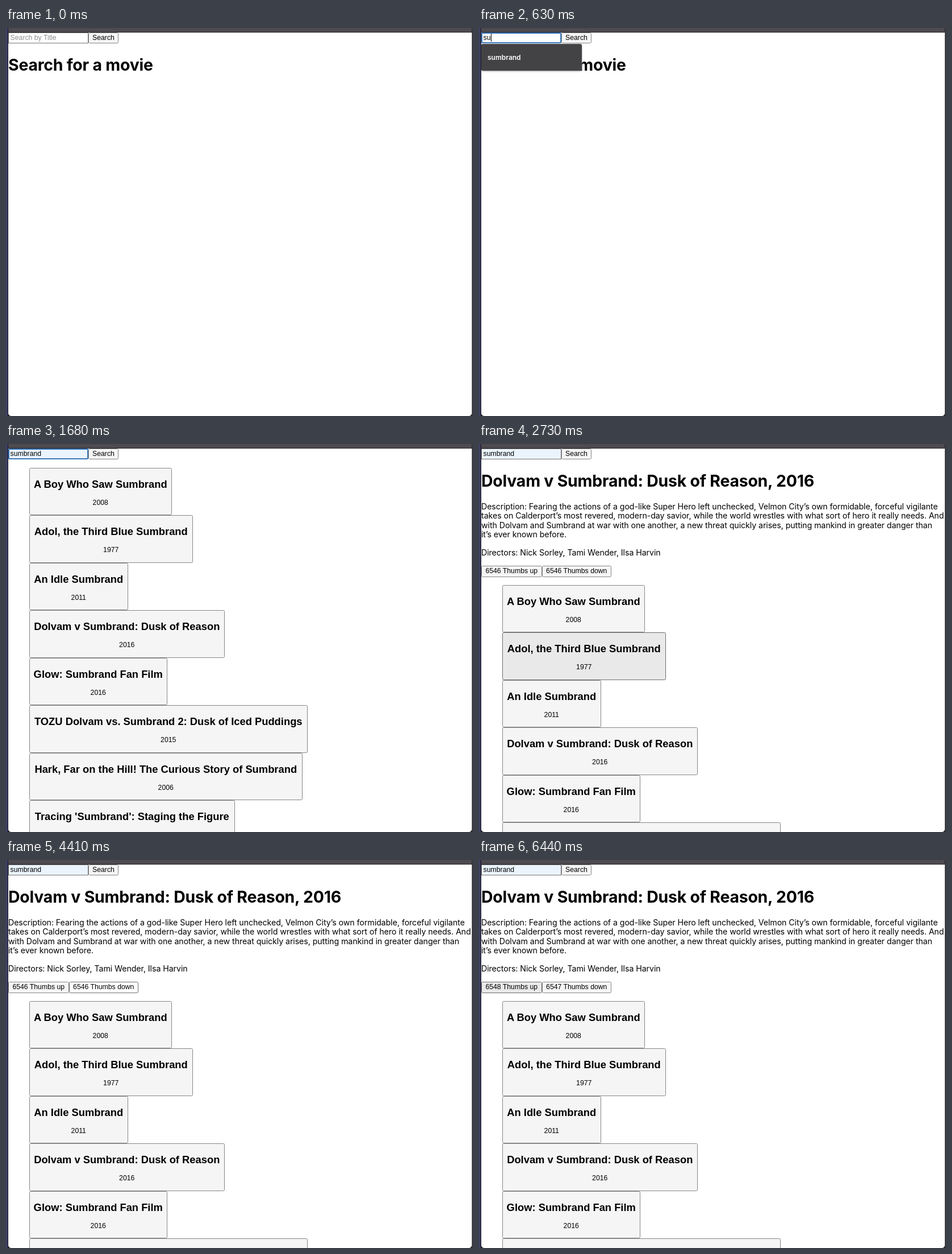
Animation of 822 by 682 pixels, one loop 6510 ms. Source, as an HTML page:

```html
<!DOCTYPE html>
<html lang="en">
<head>
<meta charset="utf-8">
<title>Movie search</title>
<style>
  html, body { margin: 0; width: 100%; height: 100%; overflow: hidden; }
  body {
    position: relative;
    background: linear-gradient(90deg, #3c3d66 0 3px, #17171c 3px 821px, #55555a 821px);
    color: #000;
    font: 14.2px/16.6px Inter, sans-serif;
  }
  body * { position: absolute; box-sizing: border-box; margin: 0; white-space: pre; }
  #bar { left: 4px; top: 0; width: 816px; height: 8px; background: #4d4a50; border-bottom: 1px solid #242327; }
  #page { left: 4px; top: 8px; width: 816px; height: 674px; background: #fff; border-radius: 0 0 5px 5px; overflow: hidden; }
  /* lets children use stage coordinates */
  #stage { left: -4px; top: -8px; width: 822px; height: 682px; }

  .control, .movie {
    border: 1px solid #868686; border-radius: 2.5px; background: #f5f5f5;
    font: 12.25px/17.5px "Liberation Sans", Arial, sans-serif; text-align: center;
  }
  .control { height: 19.5px; }
  .hover { background: #e9e9e9; border-color: #6c6c6c; }
  .active { background: #fff; }

  #field { left: 4px; top: 7.5px; width: 141px; background: #fff; border-color: #767676; border-radius: 0; text-align: left; padding-left: 2.6px; }
  #field span { position: static; }
  #field.filled { background: #ebf4fd; }
  #field.focus { border: 2px solid #3b78b8; border-radius: 2px; padding-left: 1.6px; line-height: 15.5px; }
  #field.empty #typed { color: #8f8f8f; }
  #caret { display: inline-block; width: 1px; height: 14px; margin-right: -1px; background: #000; vertical-align: -3px; }
  #search { left: 145px; top: 7.5px; width: 53px; }

  h1 { left: 4px; top: 47.5px; font: 700 28.4px/34px Inter, sans-serif; letter-spacing: -.2px; }
  #details { inset: 0; }
  p { left: 4px; letter-spacing: -.07px; }
  #about { top: 101.5px; }
  #crew { top: 182.5px; }
  #up { left: 4px; top: 214px; width: 106.5px; }
  #down { left: 110.5px; top: 214px; width: 122.5px; }

  #list { left: 40.5px; }
  .movie { height: 83.5px; }
  .movie h2 { left: -20px; right: -20px; top: 17px; font: 700 18.35px/22px "Liberation Sans", Arial, sans-serif; }
  .movie span { left: 0; right: 0; top: 53px; line-height: 15px; }

  #menu { left: 4px; top: 28px; width: 177px; padding: 7px 0; background: #434244; border-radius: 3px; box-shadow: 0 1px 3px #0006; }
  #menu div {
    position: static; height: 33.2px; padding-left: 11px; color: #fff;
    font: 600 12px/33.2px Inter, sans-serif;
  }
  #menu .picked { background: #605f62; }
  [hidden] { display: none !important; }
</style>
</head>
<body>
<div id="bar"></div>
<div id="page"><div id="stage">
  <div id="field" class="control"><span id="typed"></span><span id="caret"></span></div>
  <div id="search" class="control">Search</div>
  <h1 id="heading"></h1>
  <div id="details">
    <p id="about">Description: Fearing the actions of a god-like Super Hero left unchecked, Velmon City’s own formidable, forceful vigilante
takes on Calderport’s most revered, modern-day savior, while the world wrestles with what sort of hero it really needs. And
with Dolvam and Sumbrand at war with one another, a new threat quickly arises, putting mankind in greater danger than
it’s ever known before.</p>
    <p id="crew">Directors: Nick Sorley, Tami Wender, Ilsa Harvin</p>
    <div id="up" class="control"></div>
    <div id="down" class="control"></div>
  </div>
  <div id="list"></div>
  <div id="menu"></div>
</div></div>
<script>
const LOOP = 6510;
const $ = id => document.getElementById(id);

// title, year, button width
const movies = [
  ["A Boy Who Saw Sumbrand", 2008, 251.5],
  ["Adol, the Third Blue Sumbrand", 1977, 288.5],
  ["An Idle Sumbrand", 2011, 174.5],
  ["Dolvam v Sumbrand: Dusk of Reason", 2016, 344.5],
  ["Glow: Sumbrand Fan Film", 2016, 243.5],
  ["TOZU Dolvam vs. Sumbrand 2: Dusk of Iced Puddings", 2015, 490.5],
  ["Hark, Far on the Hill! The Curious Story of Sumbrand", 2006, 481.5],
  ["Tracing 'Sumbrand': Staging the Figure", 1981, 362.5]
];
const pastSearches = ["sumbrand", "space", "storm", "sea", "night", "love"];

const add = (parent, tag, text, className = "") => {
  const el = document.createElement(tag);
  el.textContent = text;
  el.className = className;
  return parent.appendChild(el);
};

const cards = movies.map(([title, year, width], i) => {
  const card = add($("list"), "div", "", "movie");
  card.style.top = i * 83.5 + "px";
  card.style.width = width + "px";
  add(card, "h2", title);
  add(card, "span", year);
  return card;
});
const rows = pastSearches.map(word => add($("menu"), "div", word));
const targets = { up: $("up"), down: $("down") };
cards.forEach((card, i) => targets["card" + i] = card);

const start = {
  text: "", focus: false, caret: false, filled: false, menu: 0, picked: false,
  results: false, details: false, hover: "", active: "", up: 6546, down: 6546
};

// each step changes only the listed properties
const steps = [
  [140, { focus: true, caret: true }],
  [210, { menu: 6 }],
  [280, { text: "s" }],
  [350, { menu: 4 }],
  [560, { text: "su" }],
  [630, { menu: 1 }],
  [770, { text: "sup".slice(0, 2) + "m", caret: false }],
  [980, { caret: true }],
  [1190, { text: "sumbrand", caret: false, filled: true, picked: true }],
  [1470, { menu: 0, picked: false }],
  [1680, { results: true }],
  [1820, { caret: true }],
  [2170, { hover: "card2" }],
  [2310, { caret: false }],
  [2450, { hover: "" }],
  [2520, { hover: "card3" }],
  [2660, { focus: false, active: "card3" }],
  [2730, { details: true, hover: "card1", active: "" }],
  [3500, { hover: "card0" }],
  [3710, { hover: "" }],
  [4060, { hover: "down" }],
  [4410, { active: "down" }],
  [4480, { active: "" }],
  [4760, { down: 6547 }],
  [4900, { hover: "" }],
  [5320, { hover: "up" }],
  [5600, { active: "up" }],
  [5810, { active: "" }],
  [5950, { up: 6547 }],
  [6160, { active: "up" }],
  [6230, { active: "" }],
  [6440, { up: 6548 }]
];

function draw(s) {
  $("typed").textContent = s.text || "Search by Title";
  $("field").classList.toggle("empty", !s.text);
  $("field").classList.toggle("focus", s.focus);
  $("field").classList.toggle("filled", s.filled);
  $("caret").hidden = !s.caret || !s.text;

  $("heading").textContent = s.details ? movies[3][0] + ", " + movies[3][1] : "Search for a movie";
  $("heading").hidden = s.results && !s.details;
  $("details").hidden = !s.details;
  $("up").textContent = s.up + " Thumbs up";
  $("down").textContent = s.down + " Thumbs down";

  $("list").hidden = !s.results;
  $("list").style.top = (s.details ? 247.7 : 41.5) + "px";
  for (const name in targets) {
    targets[name].classList.toggle("hover", s.hover === name);
    targets[name].classList.toggle("active", s.active === name);
  }

  $("menu").hidden = !s.menu;
  rows.forEach((row, i) => row.hidden = i >= s.menu);
  rows[0].classList.toggle("picked", s.picked);
}

let shown = -1;
function tick() {
  const t = performance.now() % LOOP;
  const past = steps.filter(([at]) => at <= t);
  if (past.length !== shown) {
    shown = past.length;
    draw(Object.assign({}, start, ...past.map(step => step[1])));
  }
  requestAnimationFrame(tick);
}
tick();
</script>
</body>
</html>
```
